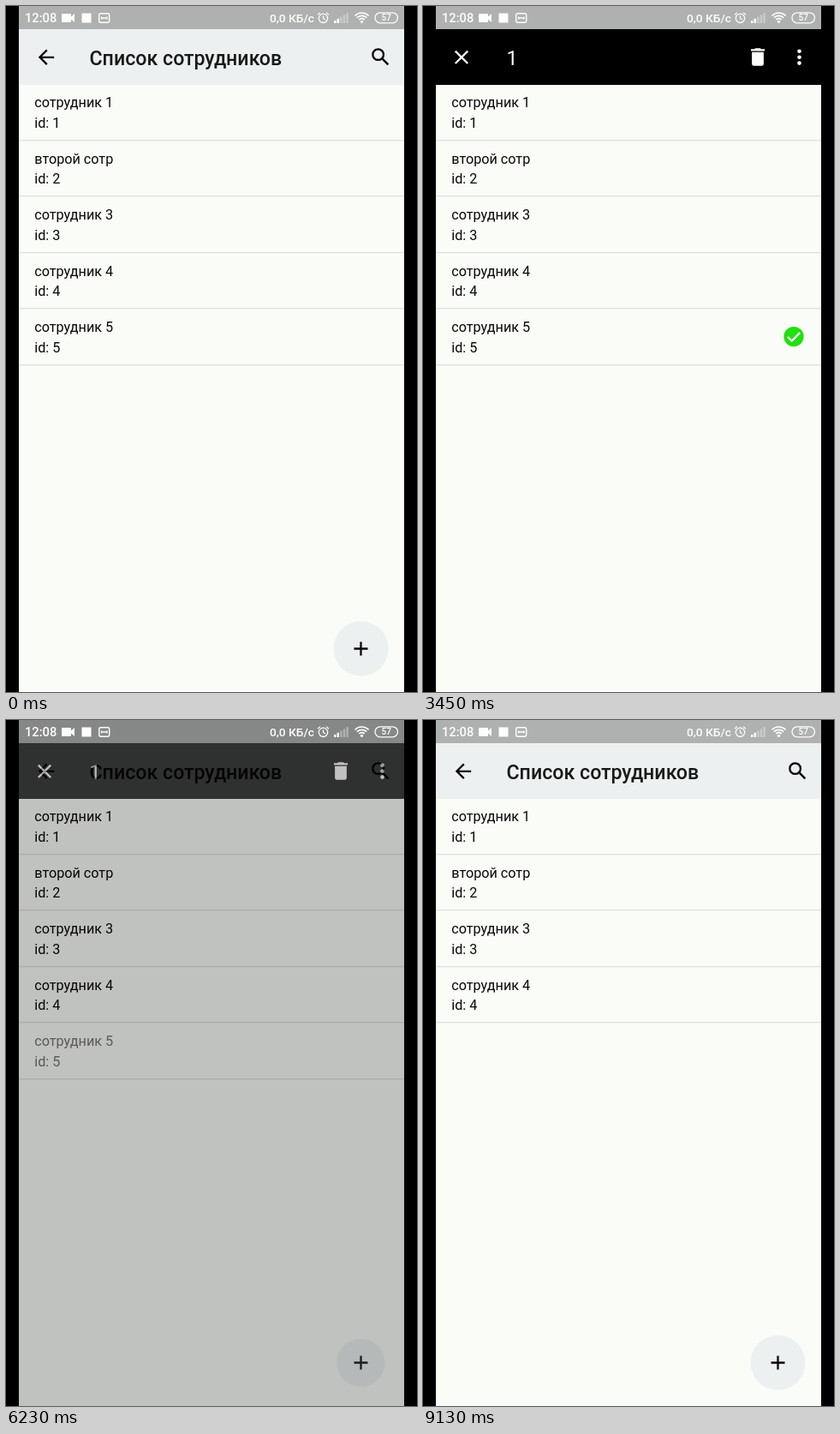
An HTML page with a canvas that plays this animation: 480x800 px, repeating every 9.17 s.

```html
<!DOCTYPE html>
<html lang="ru">
<head>
<meta charset="utf-8">
<style>
html, body { margin: 0; width: 100%; height: 100%; overflow: hidden; background: #000; }
canvas { display: block; width: 480px; height: 800px; }
</style>
</head>
<body>
<canvas id="stage" width="480" height="800"></canvas>
<script>
const stage = document.getElementById('stage').getContext('2d');
const buffer = new OffscreenCanvas(480, 800).getContext('2d');
let ctx = stage;

const LOOP = 9170;
const DP = 1.146, SP = 1.157;
const BODY = 14 * SP, TITLE = 20 * SP;
const SELECT = 2380, ASK = 4195, CONFIRM = 6145;
const ROW_TOP = 92, ROW_H = 65.4;
const ROWS = ['сотрудник 1', 'второй сотр', 'сотрудник 3', 'сотрудник 4', 'сотрудник 5'];
const COLOR = {
  page: '#fafcf8', bar: '#ecf0f0', status: '#aeb1af', line: '#dfe1df',
  press: '#eef1ee', light: '#fdfefb', ink: '#080808', check: '#20e00e'
};

const ramp = (t, start, length) => Math.min(1, Math.max(0, (t - start) / length));
const easeOut = p => 1 - Math.pow(1 - p, 4);

function layer(alpha, draw) {
  if (alpha <= 0) return;
  ctx.save();
  ctx.globalAlpha *= alpha;
  draw();
  ctx.restore();
}

// Fades several overlapping shapes as one picture.
function group(alpha, draw) {
  if (alpha <= 0) return;
  buffer.clearRect(0, 0, 480, 800);
  ctx = buffer;
  ctx.save();
  draw();
  ctx.restore();
  ctx = stage;
  layer(alpha, () => ctx.drawImage(buffer.canvas, 0, 0));
}

function rect(x, y, w, h, fill) {
  ctx.fillStyle = fill;
  ctx.fillRect(x, y, w, h);
}

function disc(x, y, r, fill) {
  ctx.fillStyle = fill;
  ctx.beginPath();
  ctx.arc(x, y, r, 0, Math.PI * 2);
  ctx.fill();
}

function text(str, x, y, size, { weight = 400, fill = COLOR.ink, align = 'left' } = {}) {
  ctx.font = `${weight} ${size}px Roboto, sans-serif`;
  ctx.fillStyle = fill;
  ctx.textAlign = align;
  ctx.fillText(str, x, y);
}

function stroke(path, color, width) {
  ctx.strokeStyle = color;
  ctx.lineWidth = width;
  ctx.stroke(new Path2D(path));
}

// Draws on a 24-unit grid centred on (x, y).
function icon(x, y, draw) {
  ctx.save();
  ctx.translate(x, y);
  ctx.scale(DP, DP);
  ctx.translate(-12, -12);
  draw();
  ctx.restore();
}

function listBar() {
  rect(15, 27, 450, 65, COLOR.bar);
  icon(47, 59.8, () => stroke('M20 12H5.5M12.7 4.7L5.4 12l7.3 7.3', COLOR.ink, 2));
  text('Список сотрудников', 97.5, 69, TITLE, { weight: 500, fill: '#171818' });
  icon(437.5, 59.5, () => {
    ctx.strokeStyle = COLOR.ink;
    ctx.lineWidth = 2;
    ctx.beginPath();
    ctx.arc(9.5, 9.5, 5.5, 0, Math.PI * 2);
    ctx.stroke();
    stroke('M13.7 13.7L19.7 19.7', COLOR.ink, 2.2);
  });
}

function selectionBar() {
  rect(15, 27, 450, 65, '#000');
  icon(45, 59.8, () => stroke('M5.7 5.7L18.3 18.3M18.3 5.7L5.7 18.3', COLOR.light, 2));
  text('1', 97.5, 69, TITLE, { fill: COLOR.light });
  icon(391, 59.5, () => {
    ctx.fillStyle = COLOR.light;
    ctx.fill(new Path2D('M6 7h12v12q0 2-2 2h-8q-2 0-2-2zM5 4h3.5l1-1h5l1 1H19v2H5z'));
  });
  for (const k of [-1, 0, 1]) disc(439.5, 59.7 + k * 6.9, 2.3, COLOR.light);
}

function list(t) {
  rect(15, ROW_TOP, 450, 800 - ROW_TOP, COLOR.page);
  const removed = ramp(t, CONFIRM + 30, 125);
  const pressed = ramp(t, SELECT - 480, 120) * (1 - ramp(t, SELECT, 120));
  ROWS.forEach((name, i) => {
    const last = i === ROWS.length - 1;
    if (last && removed === 1) return;
    const top = ROW_TOP + i * ROW_H;
    if (last) layer(pressed, () => rect(15, top, 450, ROW_H, COLOR.press));
    layer(last ? 1 - removed : 1, () => {
      text(name, 33.3, top + 26.3, BODY);
      text('id: ' + (i + 1), 33.3, top + 50, BODY);
    });
    rect(15, Math.round(top + ROW_H - 1.4), 450, 1.3, COLOR.line);
  });
  if (t >= SELECT && t < CONFIRM + 20) {
    disc(433, 385.5, 11.6, COLOR.check);
    icon(433, 385.5, () => stroke('M5.8 12.2l4.2 4.2 8.3-8.4', '#fff', 2));
  }
}

function addButton(t) {
  const shown = t < CONFIRM ? 1 - ramp(t, SELECT, 160) : easeOut(ramp(t, CONFIRM, 210));
  layer(shown, () => {
    disc(414.5, 749.5, 32 * shown, COLOR.bar);
    icon(414.5, 749.5, () => stroke('M5 12h14M12 5v14', COLOR.ink, 2));
  });
}

function dialog() {
  ctx.save();
  ctx.shadowColor = 'rgba(0,0,0,.55)';
  ctx.shadowBlur = 30;
  ctx.shadowOffsetY = 12;
  ctx.fillStyle = '#fff';
  ctx.beginPath();
  ctx.roundRect(44.5, 324, 391, 180, 3);
  ctx.fill();
  ctx.restore();
  ctx.fillStyle = COLOR.bar;
  ctx.beginPath();
  ctx.roundRect(44.5, 324, 391, 49.5, [3, 3, 0, 0]);
  ctx.fill();
  text('Выбрано записей: 1', 53.7, 358, TITLE);
  text('Вы действительно хотите удалить', 53.7, 407.3, TITLE);
  text('сотрудник 5 ?', 53.7, 434.1, TITLE);
  text('НЕТ', 142, 482.7, BODY, { weight: 500, align: 'center' });
  text('ДА', 338, 482.7, BODY, { weight: 500, align: 'center' });
}

function statusIcons() {
  const c = COLOR.light;
  text('12:08', 22, 19, 14.7, { weight: 500, fill: c });
  ctx.fillStyle = c;
  ctx.fill(new Path2D('M66 9h9q1 0 1 1v2.5l4-3.5v10l-4-3.5V18q0 1-1 1h-9q-1 0-1-1v-8q0-1 1-1z'));
  rect(88.5, 8.5, 11, 11, c);

  ctx.strokeStyle = c;
  ctx.lineWidth = 1.4;
  ctx.beginPath();
  ctx.roundRect(108.7, 8.7, 12, 10.6, 2);
  ctx.stroke();
  stroke('M111 14h7.5M111.5 12.5v3M118 12.5v3', c, 1.3);

  text('0,0 КБ/с', 308, 18.8, 13.7, { weight: 500, fill: c });

  ctx.lineWidth = 1.3;
  ctx.beginPath();
  ctx.arc(370.5, 14.3, 5.2, 0, Math.PI * 2);
  ctx.stroke();
  stroke('M370.5 11.2v3.3l2.3 1.5M364 10.3l3-2.7M377 10.3l-3-2.7', c, 1.2);

  for (let i = 0; i < 5; i++) {
    layer(i < 2 ? 1 : 0.35, () => rect(383 + i * 3.6, 17 - i * 2.2, 2.4, 3 + i * 2.2, c));
  }

  ctx.lineWidth = 1.7;
  for (const r of [4.4, 7.7, 11]) {
    ctx.beginPath();
    ctx.arc(415.5, 19, r, -Math.PI * 0.76, -Math.PI * 0.24);
    ctx.stroke();
  }
  disc(415.5, 18.3, 1.6, c);

  ctx.lineWidth = 1.3;
  ctx.beginPath();
  ctx.roundRect(431, 7.8, 26.5, 12, 6);
  ctx.stroke();
  text('57', 444.3, 17.4, 10, { weight: 500, fill: c, align: 'center' });
}

function draw(t) {
  rect(0, 0, 480, 800, '#000');
  rect(15, 0, 450, 27.5, COLOR.status);
  list(t);
  addButton(t);
  listBar();
  group(ramp(t, SELECT, 200) * (1 - ramp(t, CONFIRM + 20, 250)), selectionBar);

  const dim = 0.52 * ramp(t, ASK, 125) * (1 - ramp(t, CONFIRM, 155));
  layer(dim, () => rect(15, 0, 450, 800, '#000'));

  const opened = ramp(t, ASK, 115);
  group(opened * (1 - ramp(t, CONFIRM, 80)), () => {
    const scale = 0.92 + 0.08 * easeOut(opened);
    ctx.translate(240, 414);
    ctx.scale(scale, scale);
    ctx.translate(-240, -414);
    dialog();
  });
  statusIcons();
}

const started = performance.now();
function tick() {
  draw((performance.now() - started) % LOOP);
  requestAnimationFrame(tick);
}
tick();
</script>
</body>
</html>
```
